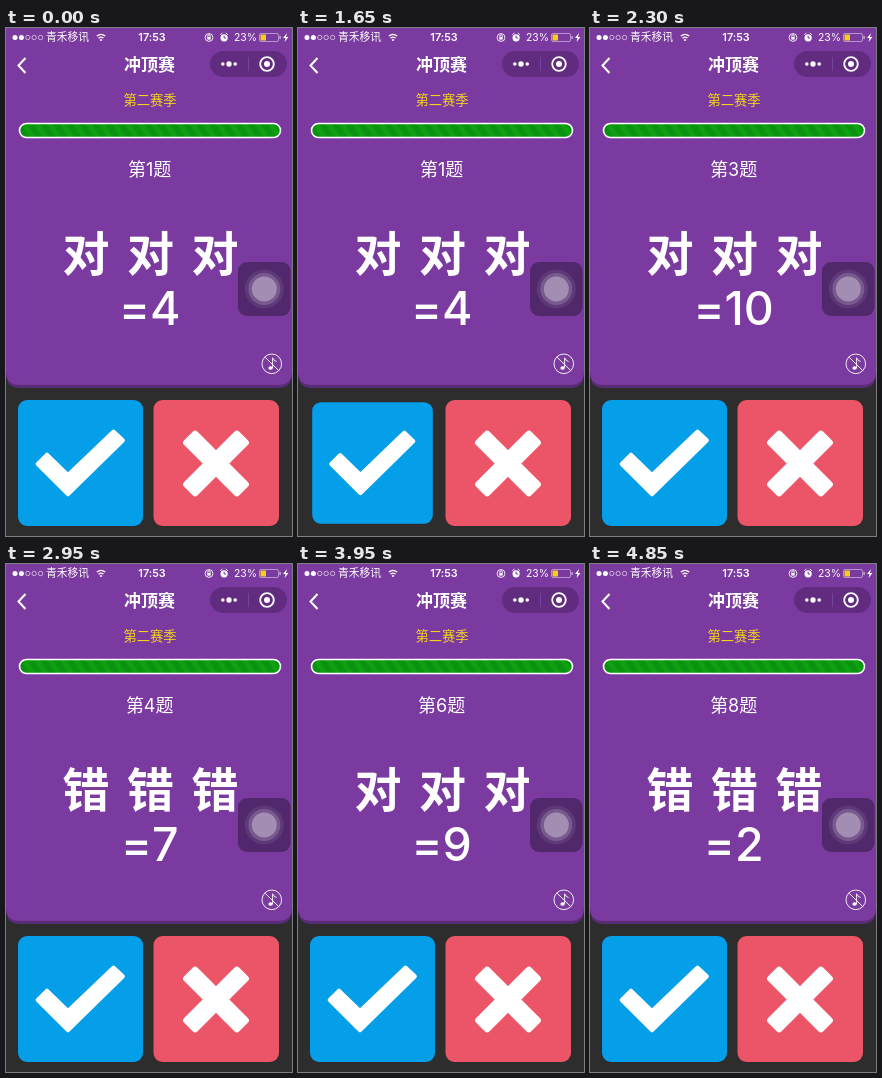
An HTML page for the animation above (5000 ms loop, 286 by 508 pixels).

```html
<!DOCTYPE html>
<html lang="zh-CN">
<head>
<meta charset="utf-8">
<title>冲顶赛</title>
<style>
  html, body { margin: 0; width: 100%; height: 100%; overflow: hidden; background: #2d2d2d; }
  svg { display: block; width: 100vw; height: 100vh; }
  text {
    font-family: Inter, "Noto Sans CJK SC", "Noto Sans CJK", sans-serif;
    font-variant-ligatures: no-contextual;
    fill: #fff; text-anchor: middle;
  }
  .line { fill: none; stroke: #fff; }
  .small { font-size: 10.8px; }
  .word { font-size: 47px; font-weight: 700; }
  .sum { font-size: 46.5px; font-weight: 500; }
  .key { transform-box: fill-box; transform-origin: center; }
</style>
</head>
<body>
<svg viewBox="0 0 286 508">
  <defs>
    <pattern id="stripes" width="11" height="11" patternUnits="userSpaceOnUse" patternTransform="rotate(58)">
      <rect width="11" height="11" fill="#0a930e"/>
      <rect width="11" height="5" fill="#0fa012"/>
    </pattern>
    <clipPath id="track"><rect x="14" y="96" width="260" height="13" rx="6.5"/></clipPath>
  </defs>

  <rect width="286" height="508" fill="#2d2d2d"/>
  <path d="M0 0H286V346Q286 360 272 360H14Q0 360 0 346Z" fill="#582b75"/>
  <path d="M0 0H286V343Q286 357 272 357H14Q0 357 0 343Z" fill="#7b3a9f"/>

  <!-- status bar -->
  <g fill="#fff">
    <circle cx="9" cy="9.5" r="2.5"/><circle cx="15.4" cy="9.5" r="2.5"/>
    <g class="line" stroke-width=".7" stroke-opacity=".85">
      <circle cx="21.8" cy="9.5" r="2.2"/><circle cx="28.2" cy="9.5" r="2.2"/><circle cx="34.6" cy="9.5" r="2.2"/>
    </g>
    <text class="small" x="61.5" y="13.4">青禾移讯</text>
    <path class="line" d="M90.8 8Q95 4.6 99.2 8M92.5 10.2Q95 8.2 97.5 10.2" stroke-width="1.2"/>
    <circle cx="95" cy="12" r="1.1"/>
    <text class="small" x="146" y="13.3" font-weight="600">17:53</text>
    <g class="line" stroke-width=".9">
      <circle cx="203" cy="9.5" r="3.9"/><path d="M201.8 9V8a1.2 1.2 0 0 1 2.4 0v1"/>
      <path d="M214.4 6.8l2-2M221.8 6.8l-2-2"/>
      <rect x="253.5" y="5.5" width="19" height="8" rx="1.5" stroke-opacity=".5"/>
    </g>
    <rect x="201.3" y="9" width="3.4" height="2.6"/>
    <circle cx="218.1" cy="9.8" r="3.6"/>
    <path d="M218.1 7.5v2.5h2" class="line" style="stroke:#7b3a9f"/>
    <text class="small" x="239.5" y="13.3" style="font-size:10.4px">23%</text>
    <rect x="254.5" y="6.5" width="5.5" height="6" fill="#f5cf20"/>
    <rect x="273.4" y="8" width="1.4" height="3" opacity=".6"/>
    <path d="M281 5l-4 5h2.5l-1 4 4-5H280Z"/>
  </g>

  <!-- title row -->
  <path class="line" d="M19.5 30L12.5 37.5L19.5 45" stroke-width="2"/>
  <text x="143.5" y="43" font-size="17" font-weight="700">冲顶赛</text>
  <rect x="204" y="23" width="77" height="26" rx="13" fill="#612c80"/>
  <g fill="#fff">
    <circle cx="216.8" cy="36" r="1.8"/><circle cx="223" cy="36" r="2.7"/><circle cx="229.2" cy="36" r="1.8"/>
    <circle cx="261" cy="36" r="3"/>
  </g>
  <circle class="line" cx="261" cy="36" r="6.8" stroke-width="1.8"/>
  <path d="M242.5 29V43" stroke="#75419a"/>

  <text x="144" y="76.5" font-size="13.3" style="fill:#f2d51b">第二赛季</text>

  <g clip-path="url(#track)"><rect id="fill" x="13" y="95" width="262" height="15" fill="url(#stripes)"/></g>
  <rect class="line" x="13.5" y="95.5" width="261" height="14" rx="7" stroke-width="1.6"/>

  <text id="number" x="143.7" y="147.7" font-size="18"></text>
  <g id="word" class="word">
    <text x="80"  y="243"></text><text x="144.5" y="243"></text><text x="209" y="243"></text>
  </g>
  <text id="sum" class="sum" x="143.7" y="297.3"></text>

  <!-- floating touch button -->
  <rect x="232" y="234" width="52.5" height="54" rx="9" fill="#50286b"/>
  <circle cx="258.3" cy="261" r="19.5" fill="#5d3978"/>
  <circle cx="258.3" cy="261" r="16" fill="#795a8f"/>
  <circle cx="258.3" cy="261" r="12.5" fill="#a48db3"/>

  <!-- muted sound -->
  <g class="line" stroke-width="1" stroke-opacity=".9">
    <circle cx="265.8" cy="335.8" r="9.8"/>
    <path d="M258.8 329L272.8 342.6M266.6 340V329.8Q267.5 332.5 270.6 333.6"/>
  </g>
  <ellipse cx="264.6" cy="340" rx="2.2" ry="1.7" fill="#fff"/>

  <g id="yes" class="key">
    <rect x="12" y="372" width="125" height="126" rx="9" fill="#059ee9"/>
    <path d="M31.9 436L41 427L62 447.4L107.5 403.8L116.6 412.5L62 466Z" fill="#fff" stroke="#fff" stroke-width="4.5" stroke-linejoin="round"/>
  </g>
  <g id="no" class="key">
    <rect x="147.5" y="372" width="125.5" height="126" rx="9" fill="#ec5567"/>
    <g fill="#fff" transform="translate(210 435.5) rotate(45)">
      <rect x="-39" y="-9.5" width="78" height="19" rx="3.5"/>
      <rect x="-9.5" y="-39" width="19" height="78" rx="3.5"/>
    </g>
  </g>
</svg>
<script>
  const LOOP = 5000, TICK = 250, TICK_WIDTH = 6;
  const questions = [
    [0, '对', 4], [1750, '错', 6], [2300, '对', 10], [2800, '错', 7],
    [3350, '错', 3], [3750, '对', 9], [4200, '错', 16], [4700, '错', 2]
  ];
  const presses = { yes: [[1650, 1800], [4050, 4150]], no: [[4600, 4750]] };

  const byId = id => document.getElementById(id);
  const words = [...byId('word').children];
  const origin = performance.now();
  let shown = -1;

  function showQuestion(index) {
    if (index === shown) return;
    shown = index;
    const [, word, sum] = questions[index];
    byId('number').textContent = `第${index + 1}题`;
    words.forEach(el => { el.textContent = word; });
    byId('sum').textContent = `=${sum}`;
  }

  function render() {
    const t = (performance.now() - origin) % LOOP;
    const index = questions.filter(([start]) => start <= t).length - 1;
    showQuestion(index);

    // The countdown only runs once the first answer is in.
    const ticked = index > 0 && t - questions[index][0] >= TICK;
    byId('fill').setAttribute('width', 262 - (ticked ? TICK_WIDTH : 0));

    for (const id in presses) {
      const down = presses[id].some(([from, to]) => t >= from && t < to);
      byId(id).style.transform = down ? 'scale(.965)' : 'none';
    }
    requestAnimationFrame(render);
  }
  render();
</script>
</body>
</html>
```
